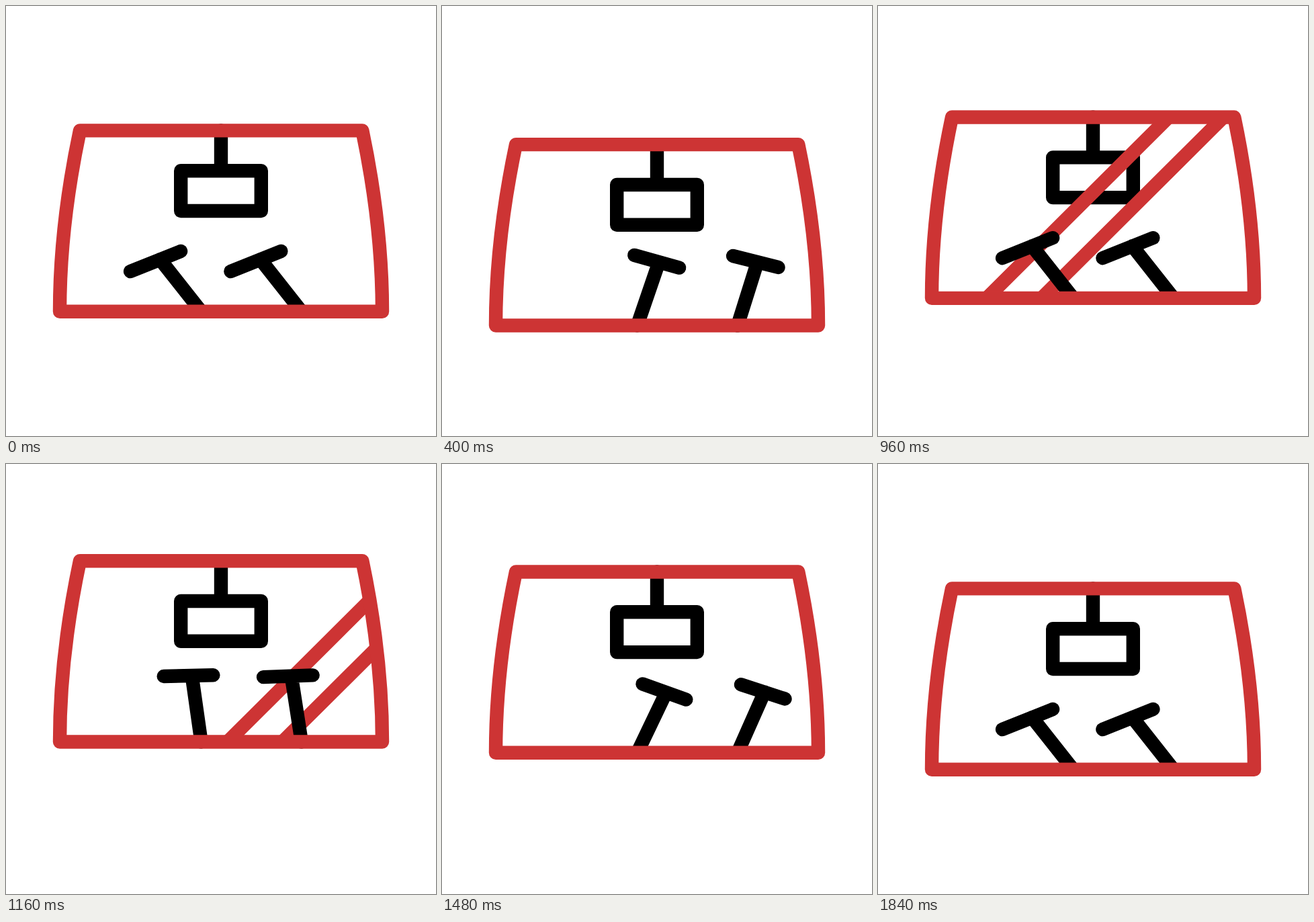
An HTML page that plays this animation: 640x640 px, repeating every 2 s.

```html
<!DOCTYPE html>
<html lang="en">
<head>
<meta charset="utf-8">
<title>Windshield</title>
<style>
  html, body { margin: 0; width: 100%; height: 100%; overflow: hidden; background: #fff; }
  svg { display: block; width: 100%; height: 100%; }
  g { fill: none; stroke-width: 20.4; stroke-linecap: round; stroke-linejoin: round; }
  .dark { stroke: #000; }
  .red { stroke: #cd3434; }
</style>
</head>
<body>
<svg viewBox="0 0 640 640">
  <defs>
    <path id="outline" d="M110 185.4H530.3Q560 327 560 454.7H80Q80 327 110 185.4Z"/>
    <clipPath id="glass"><use href="#outline"/></clipPath>
  </defs>
  <g id="car">
    <g class="dark"><path d="M320 185.4V245.2M260.2 245.2H379.8V305H260.2Z"/></g>
    <g class="red" clip-path="url(#glass)">
      <path class="stripe"/>
      <path class="stripe"/>
    </g>
    <g class="dark">
      <path class="wiper"/>
      <path class="wiper"/>
    </g>
    <g class="red"><use href="#outline"/></g>
  </g>
</svg>
<script>
  const LOOP = 2000, STEP = 40;
  const car = document.getElementById('car');
  const stripes = document.querySelectorAll('.stripe');
  const wipers = document.querySelectorAll('.wiper');

  // [time, value] keys, eased between neighbours
  const bounce = [[80, 0], [560, 28], [1200, -42], [1840, 0]];
  const swing = [[80, 0], [520, 1], [960, 0], [1400, 1], [1840, 0]];

  // x + y of each stripe at time 0, and their shared speed per ms
  const stripeStart = [-189.2, -107.5], stripeSpeed = 0.84;

  // Blade ends relative to the pivot: at rest, and their shift at full swing
  const tip = [-61.3, -77.6];
  const blade = [[-105.5, -59.7], [-30.5, -89.7]];
  const arms = [
    { x: 290.6, turn: 70, shift: [[18.7, 8.3], [-9.5, -11.5]] },
    { x: 439.9, turn: 68.2, shift: [[19.8, 8.7], [-8.4, -11.1]] }
  ];

  const ease = s => s * s * (3 - 2 * s);

  function valueAt(keys, t) {
    if (t <= keys[0][0]) return keys[0][1];
    for (let i = 1; i < keys.length; i++) {
      const [t0, a] = keys[i - 1], [t1, b] = keys[i];
      if (t <= t1) return a + (b - a) * ease((t - t0) / (t1 - t0));
    }
    return keys[keys.length - 1][1];
  }

  function draw(t) {
    car.setAttribute('transform', `translate(0 ${valueAt(bounce, t)})`);

    stripes.forEach((el, i) => {
      const x = stripeStart[i] + stripeSpeed * t - 320;
      el.setAttribute('d', `M${x + 200} 121L${x - 200} 519`);
    });

    const k = valueAt(swing, t);
    wipers.forEach((el, i) => {
      const { x, turn, shift } = arms[i];
      const [a, b] = blade.map((p, j) => p.map((v, n) => v + shift[j][n] * k));
      el.setAttribute('d', `M0 0L${tip}M${a}L${b}`);
      el.setAttribute('transform', `translate(${x} 454.7) rotate(${turn * k})`);
    });
  }

  function tick(now) {
    draw(Math.floor(((now + 0.5) % LOOP) / STEP) * STEP);
    requestAnimationFrame(tick);
  }
  draw(0);
  requestAnimationFrame(tick);
</script>
</body>
</html>
```
